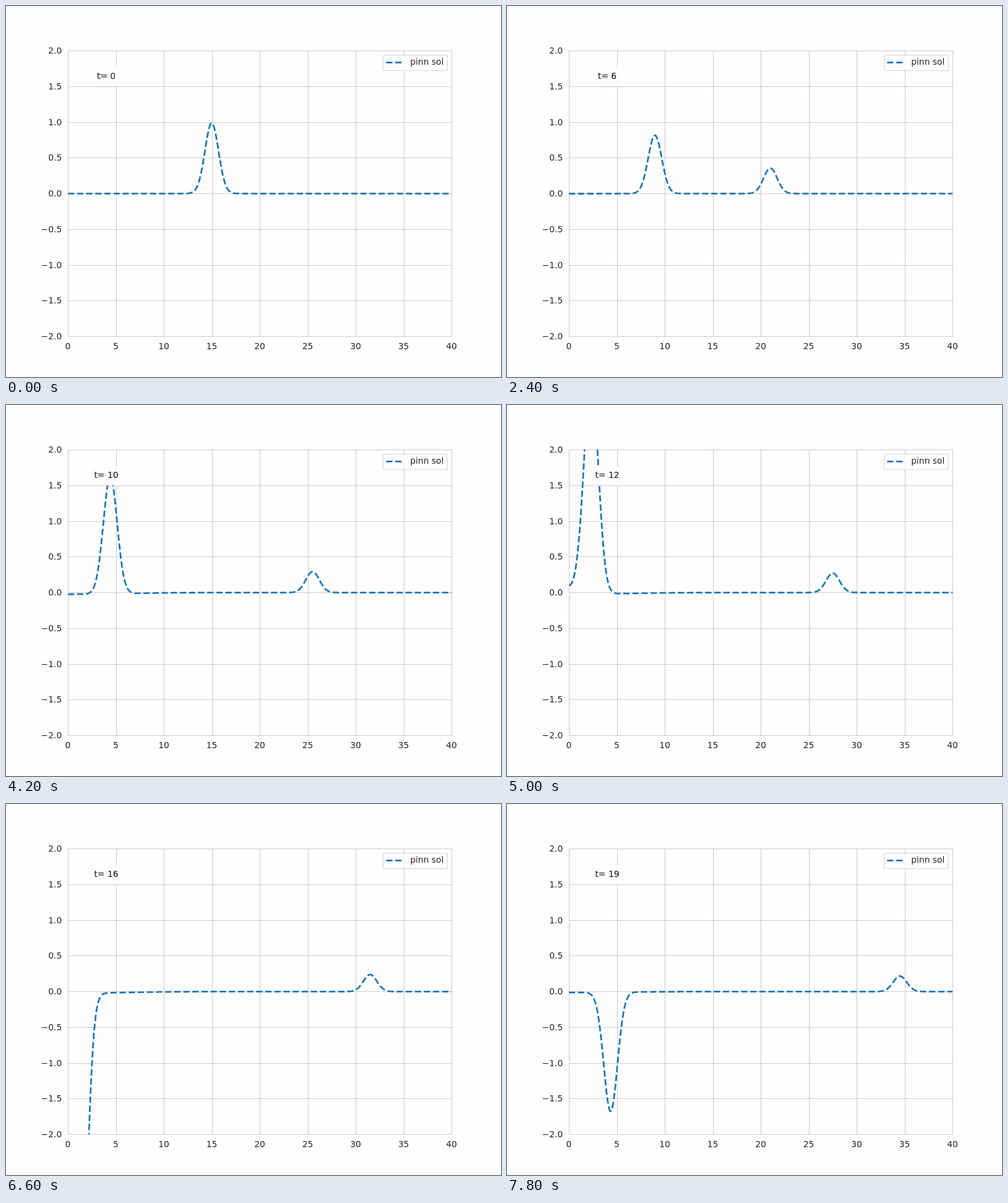
An HTML page with a canvas for the animation above (8 s loop, 800 px wide and 600 px high).

```html
<!DOCTYPE html>
<html lang="en">
<head>
<meta charset="utf-8">
<title>Spherical wave</title>
<style>
  html, body { margin: 0; width: 100%; height: 100%; overflow: hidden; background: #fefefe; }
  canvas { display: block; }
</style>
</head>
<body>
<canvas id="plot" width="800" height="600"></canvas>
<script>
const ctx = document.getElementById('plot').getContext('2d');
const STEP_MS = 200, STEPS = 40;
const BOX = { left: 100, right: 720, top: 72, bottom: 534 };
const PAPER = '#fefefe', GRID = '#cccccc', INK = '#262626', BLUE = '#1f77b4';
const FONT = '13.89px "DejaVu Sans", sans-serif';
const DASH = [10.28, 4.44];

const px = x => BOX.left + x * 15.5;
const py = y => 303 - y * 115.5;
const snap = v => Math.floor(v + 0.5) + 0.5;

function smooth(a, b, v) {
  const k = Math.min(1, Math.max(0, (v - a) / (b - a)));
  return k * k * (3 - 2 * k);
}

// Radial d'Alembert solution, reflected with a sign flip at r = 0.
const pulse = s => s * Math.exp(-((Math.abs(s) - 15) ** 2));

function wave(x, t) {
  const r = Math.max(x, 1e-3);
  const inward = 0.98 * pulse(r + t);
  const outward = (r < t ? 0.98 : 0.995) * pulse(r - t);
  const sag = 0.024 * smooth(5, 11, t) - 0.011 * smooth(17, 19.5, t);
  return (inward + outward) / (2 * r) - sag * Math.exp(-((r / 8) ** 2));
}

function line(x1, y1, x2, y2) {
  ctx.beginPath();
  ctx.moveTo(x1, y1);
  ctx.lineTo(x2, y2);
  ctx.stroke();
}

function text(str, x, y, align) {
  ctx.fillStyle = INK;
  ctx.textAlign = align;
  ctx.fillText(str, x, y);
}

function drawAxes() {
  ctx.strokeStyle = GRID;
  ctx.lineWidth = 1.1;
  for (let x = 0; x <= 40; x += 5) {
    const gx = snap(px(x));
    line(gx, BOX.top, gx, BOX.bottom + 1);
    text(String(x), px(x), 555, 'center');
  }
  for (let y = -2; y <= 2; y += 0.5) {
    const gy = snap(py(y));
    line(BOX.left, gy, BOX.right + 1, gy);
    text(y.toFixed(1).replace('-', '\u2212'), 90.3, Math.round(py(y) + 5.2), 'right');
  }
}

function bluePen() {
  ctx.strokeStyle = BLUE;
  ctx.lineWidth = 2.78;
  ctx.lineJoin = 'round';
  ctx.setLineDash(DASH);
}

// The dash pattern restarts wherever the curve re-enters the stage.
function drawCurve(t) {
  ctx.save();
  ctx.beginPath();
  ctx.rect(BOX.left, BOX.top, 620, 462);
  ctx.clip();
  bluePen();
  ctx.beginPath();
  const inside = p => p.y >= -1 && p.y <= 601;
  const crossing = (a, b) => {
    const edge = Math.min(a.y, b.y) < -1 ? -1 : 601;
    return a.x + (b.x - a.x) * (edge - a.y) / (b.y - a.y);
  };
  const edgeOf = p => p.y < -1 ? -1 : 601;
  let prev = null;
  for (let n = 0; n <= 400; n++) {
    const x = n / 10;
    const p = { x: px(x), y: py(wave(x, t)) + 0.3 };
    if (!prev) {
      if (inside(p)) ctx.moveTo(p.x, p.y);
    } else if (inside(p)) {
      if (!inside(prev)) ctx.moveTo(crossing(prev, p), edgeOf(prev));
      ctx.lineTo(p.x, p.y);
    } else if (inside(prev)) {
      ctx.lineTo(crossing(prev, p), edgeOf(p));
    }
    prev = p;
  }
  ctx.stroke();
  ctx.restore();
}

function drawLegend() {
  ctx.save();
  ctx.beginPath();
  ctx.roundRect(609.5, 79.5, 104, 25, 2.8);
  ctx.globalAlpha = 0.8;
  ctx.fillStyle = PAPER;
  ctx.fill();
  ctx.strokeStyle = GRID;
  ctx.lineWidth = 1.2;
  ctx.stroke();
  ctx.globalAlpha = 1;
  bluePen();
  line(614.3, 91.3, 642.1, 91.3);
  ctx.restore();
  text('pinn sol', 653.2, 95, 'left');
}

// Labels pile up, each on its own translucent box.
function drawLabels(step) {
  const cover = (half, alpha) => {
    ctx.globalAlpha = alpha;
    ctx.fillStyle = PAPER;
    ctx.fillRect(162 - half, 99, 2 * half, 30.5);
    ctx.globalAlpha = 1;
  };
  cover(step < 20 ? 22 : 26.5, 1);
  if (step < 4) text('t=', 149.5, 118, 'left');
  for (let n = Math.max(0, step - 4); n <= step; n++) {
    cover(n < 20 ? 22 : 26.5, 0.6);
    text('t= ' + Math.floor(n / 2), 162, 118, 'center');
  }
}

function draw(step) {
  ctx.fillStyle = PAPER;
  ctx.fillRect(0, 0, 800, 600);
  ctx.font = FONT;
  drawAxes();
  drawCurve(step / 2);
  drawLabels(step);
  drawLegend();
}

function tick() {
  draw(Math.floor(performance.now() / STEP_MS) % STEPS);
  requestAnimationFrame(tick);
}
tick();
</script>
</body>
</html>
```
